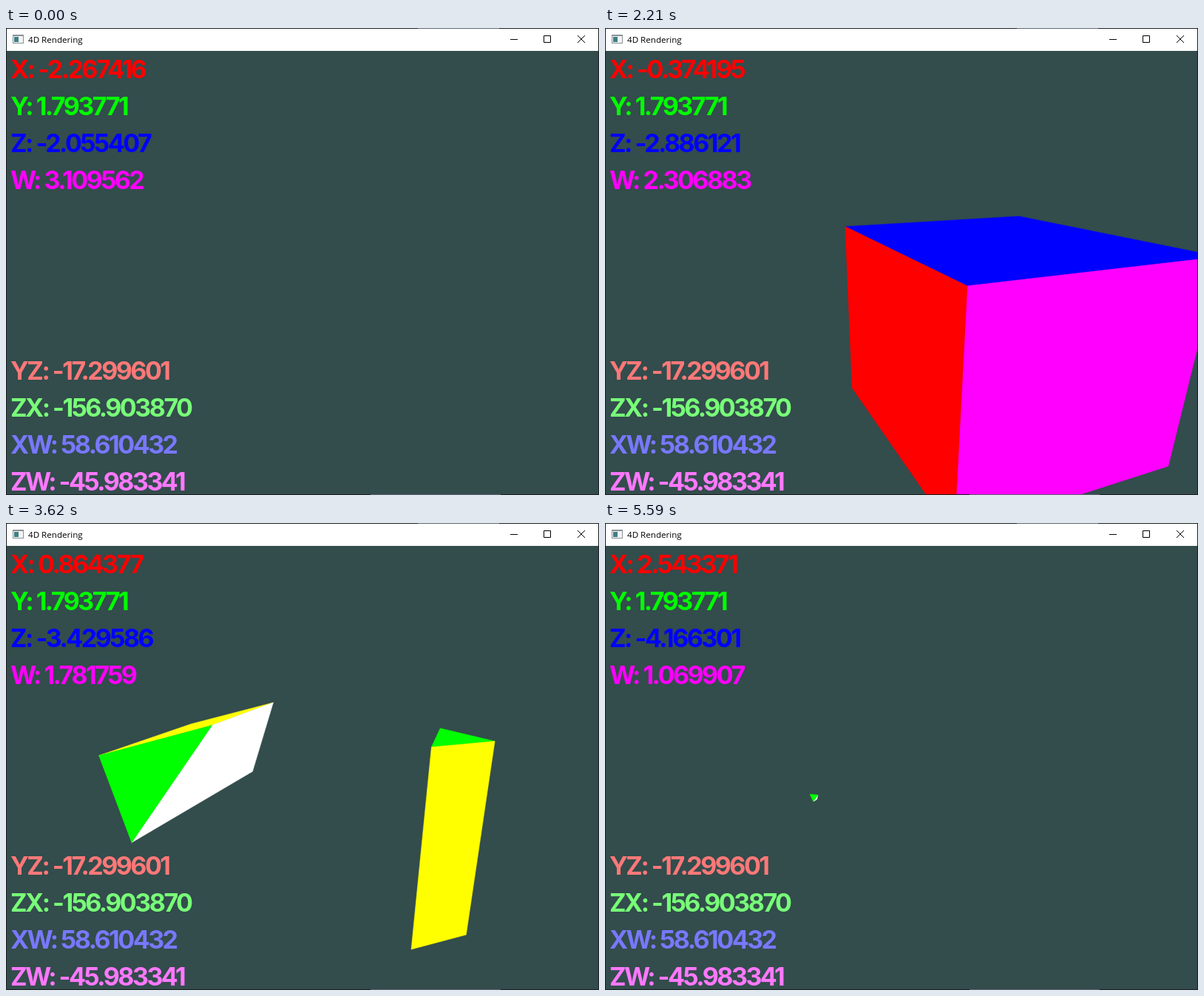
Recreate the animation shown at these times as an HTML page with a canvas. Size 802 by 632 pixels, loop 5640 ms.

```html
<!DOCTYPE html>
<html>
<head>
<meta charset="utf-8">
<title>4D Rendering</title>
<style>
html, body { margin: 0; width: 100%; height: 100%; overflow: hidden; background: #334c4c; }
canvas { display: block; }
</style>
</head>
<body>
<canvas id="stage" width="802" height="632"></canvas>
<script>
const ctx = document.getElementById("stage").getContext("2d");
const LOOP = 5640;

const TIMES = [0, 880, 1750, 2660, 3620, 4830, 5590];
const STEPS = [0, 19, 37, 57, 78, 104, 120];
const XS = [-2.267416, -1.511114, -0.775978, 0.027588, 0.864377, 1.906655, 2.543371];
const START = [XS[0], 1.793771, -2.055407, 3.109562];
const END = [XS[6], 1.793771, -4.166301, 1.069907];
const ANGLES = { YZ: -17.299601, ZX: -156.90387, XW: 58.610432, ZW: -45.983341 };

const rad = d => d * Math.PI / 180;
const [sp, cp, sy, cy, sx, cx, sw, cw] = Object.values(ANGLES)
  .flatMap(a => [Math.sin(rad(a)), Math.cos(rad(a))]);
const dot = (a, b) => a.reduce((sum, v, i) => sum + v * b[i], 0);
const sub = (a, b) => a.map((v, i) => v - b[i]);
const cross = (a, b) => [
  a[1] * b[2] - a[2] * b[1], a[2] * b[0] - a[0] * b[2], a[0] * b[1] - a[1] * b[0]];
const mean = pts => [0, 1, 2].map(k => pts.reduce((s, p) => s + p[k], 0) / pts.length);

// Axes of the visible 3D slice; the camera travels against NORMAL.
const AXIS_X = [cx, 0, -sw * sx, cw * sx];
const AXIS_Z = [0, 0, cw, sw];
const NORMAL = [-sx, 0, -sw * cx, cw * cx];
const FOCAL = 536;

function interp(v, from, to) {
  let i = 1;
  while (i < from.length - 1 && v > from[i]) i++;
  const f = Math.min(1, (v - from[i - 1]) / (from[i] - from[i - 1]));
  return to[i - 1] + f * (to[i] - to[i - 1]);
}

// Homogeneous screen point plus the distance along NORMAL.
function toView(p) {
  const rel = sub(p, START);
  const a = dot(rel, AXIS_X), b = rel[1], c = dot(rel, AXIS_Z);
  const right = a * cy - c * sy, ahead = -a * sy - c * cy;
  const depth = ahead * cp + b * sp, up = -ahead * sp + b * cp;
  return [401 * depth + FOCAL * right, 331 * depth - FOCAL * up, depth, dot(p, NORMAL)];
}

const tesseract = {
  verts: Array.from({ length: 16 }, (_, i) => toView([0, 1, 2, 3].map(k => (i >> k & 1) * 2 - 1))),
  linked: (i, j) => [1, 2, 4, 8].includes(i ^ j),
  cells: 8,
  inCell: (c, i) => (i >> (c >> 1) & 1) === (c & 1),
  color(c, off) {
    const prism = ["red", "lime", "yellow", "white"];
    const full = ["yellow", "blue", "magenta", "red"];
    return (Math.abs(off) > 0.85 ? prism : full)[c >> 1];
  }
};

// Rows: height above the tip, screen drift x and y, depth drift.
const TIP = [284.7, 375.5, -3.409];
const simplex = {
  verts: [
    [0, 0, 0, 0],
    [1.535, -118.3, -130.5, 0.015],
    [1.72, 49.2, -115.3, -0.099],
    [2.39, -45.06, 22.4, -0.0995],
    [2.45, 31.2, -25.1, 0.148]
  ].map(([h, kx, ky, m]) => {
    const depth = 1 + h * m;
    return [TIP[0] * depth + h * kx, TIP[1] * depth + h * ky, depth, TIP[2] + h];
  }),
  linked: () => true,
  cells: 5,
  inCell: (c, i) => c !== i,
  color: c => ["yellow", "white", "magenta", "red", "lime"][c]
};

function slice(shape, off, keep) {
  const pts = [];
  shape.verts.forEach((p, i) => {
    for (let j = i + 1; j < shape.verts.length; j++) {
      const q = shape.verts[j];
      if (!shape.linked(i, j) || !keep(i) || !keep(j)) continue;
      if ((p[3] < off) === (q[3] < off)) continue;
      const t = (off - p[3]) / (q[3] - p[3]);
      pts.push([0, 1, 2].map(k => p[k] + t * (q[k] - p[k])));
    }
  });
  return pts;
}

function drawShape(shape, off) {
  const all = slice(shape, off, () => true);
  if (all.length < 4) return;
  const middle = mean(all);
  for (let c = 0; c < shape.cells; c++) {
    const face = slice(shape, off, i => shape.inCell(c, i));
    if (face.length < 3) continue;
    const flat = p => [p[0] / p[2], p[1] / p[2]];
    const [mx, my] = flat(mean(face));
    const angle = p => Math.atan2(flat(p)[1] - my, flat(p)[0] - mx);
    face.sort((p, q) => angle(p) - angle(q));
    const n = cross(sub(face[1], face[0]), sub(face[2], face[0]));
    // Skip faces turned away from the eye.
    if (dot(n, face[0]) * dot(n, sub(middle, face[0])) <= 0) continue;
    ctx.beginPath();
    face.forEach(p => ctx.lineTo(...flat(p)));
    ctx.closePath();
    ctx.fillStyle = ctx.strokeStyle = shape.color(c, off);
    ctx.lineWidth = 0.5;
    ctx.fill();
    ctx.stroke();
  }
}

function write(text, x, y, color, font, spacing) {
  ctx.font = font;
  ctx.letterSpacing = spacing;
  ctx.fillStyle = color;
  ctx.fillText(text, x, y);
}

function readout(name, value, y, color) {
  write(name + ": " + value.toFixed(6), 6, y, color, "700 34px Inter, sans-serif", "-2.5px");
}

function rect(color, x, y, w, h) {
  ctx.fillStyle = color;
  ctx.fillRect(x, y, w, h);
}

function drawWindow() {
  rect("#fff", 1, 1, 800, 30);
  rect("#8a9296", 9, 9, 15, 12);
  rect("#f4f4f4", 10, 11, 13, 9);
  rect("#3f7f86", 11, 12, 6, 7);
  write("4D Rendering", 30, 20, "#000", "11.6px 'Open Sans', 'Noto Sans', sans-serif", "0px");
  ctx.strokeStyle = "#000";
  ctx.lineWidth = 1;
  ctx.beginPath();
  ctx.moveTo(682, 15.5);
  ctx.lineTo(692, 15.5);
  ctx.rect(727.5, 10.5, 9, 9);
  ctx.moveTo(773, 10);
  ctx.lineTo(783, 20);
  ctx.moveTo(783, 10);
  ctx.lineTo(773, 20);
  ctx.stroke();
  ctx.strokeStyle = "#1b1f20";
  ctx.strokeRect(0.5, 0.5, 801, 631);
  rect("#5c6670", 557, 0, 110, 1);
  rect("#5c6670", 493, 631, 176, 1);
}

function draw(t) {
  const step = Math.floor(interp(t, TIMES, STEPS) + 0.2);
  const progress = (interp(step, STEPS, XS) - START[0]) / (END[0] - START[0]);
  const cam = START.map((v, k) => v + progress * (END[k] - v));
  const off = dot(cam, NORMAL);

  rect("#334c4c", 0, 0, 802, 632);
  drawShape(tesseract, off);
  drawShape(simplex, off);
  const bright = ["#f00", "#0f0", "#00f", "#f0f"];
  const soft = ["#ff7878", "#78ff78", "#7878ff", "#ff78ff"];
  cam.forEach((v, i) => readout("XYZW"[i], v, 68 + 50 * i, bright[i]));
  Object.entries(ANGLES).forEach(([name, v], i) => readout(name, v, 476 + 50 * i, soft[i]));
  drawWindow();
}

const begin = performance.now();
function tick() {
  draw((performance.now() - begin) % LOOP);
  requestAnimationFrame(tick);
}
tick();
</script>
</body>
</html>
```
